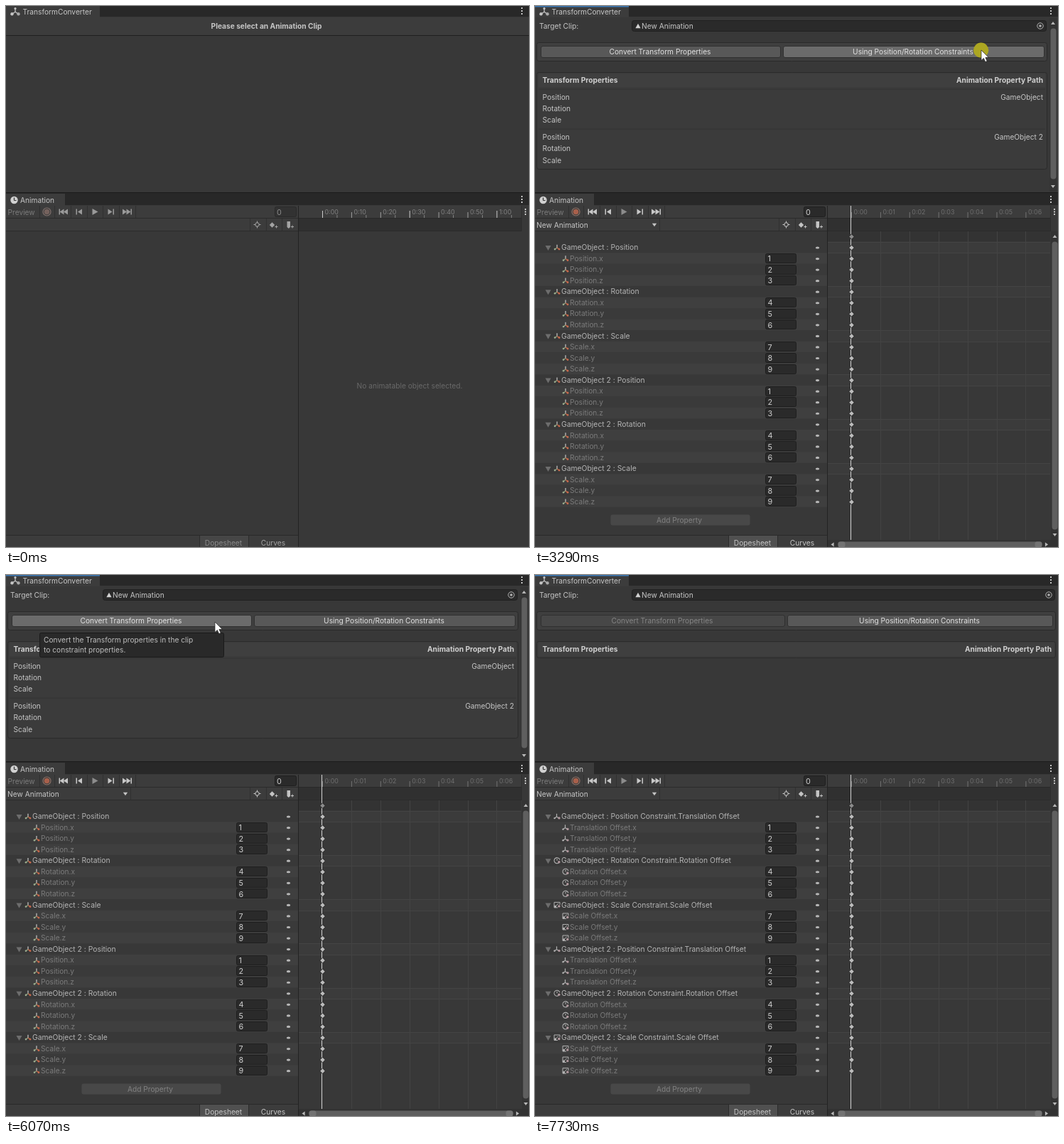
Recreate the animation shown at these times as an HTML page with a canvas. Size 736x761 px, loop 8640 ms.

```html
<!DOCTYPE html>
<html lang="en">
<head>
<meta charset="utf-8">
<title>TransformConverter</title>
<style>
html, body { margin: 0; width: 100%; height: 100%; overflow: hidden; background: #383838; }
canvas { display: block; width: 736px; height: 761px; }
</style>
</head>
<body>
<canvas id="stage" width="736" height="761"></canvas>
<script>
const g = document.getElementById('stage').getContext('2d');
const LOOP = 8640, ROW = 15.55, LIST_TOP = 331.7, TICK = 40.9;
const BG = '#383838', BAR = '#3c3c3c', DARK = '#282828', EDGE = '#232323', LABEL = '#c6c6c6', DIM = '#7b7b7b';
const PRESSES = [[3290, 3420], [4570, 4700], [7010, 7140]];

function rect(x, y, w, h, color) { g.fillStyle = color; g.fillRect(x, y, w, h); }

function box(x, y, w, h, r, fill, stroke) {
  g.beginPath();
  g.roundRect(x + .5, y + .5, w - 1, h - 1, r);
  if (fill) { g.fillStyle = fill; g.fill(); }
  if (stroke) { g.strokeStyle = stroke; g.lineWidth = 1; g.stroke(); }
}

function poly(color, ...p) {
  g.beginPath();
  for (let i = 0; i < p.length; i += 2) g.lineTo(p[i], p[i + 1]);
  g.closePath();
  g.fillStyle = color;
  g.fill();
}

function line(color, w, ...p) {
  g.beginPath();
  for (let i = 0; i < p.length; i += 4) { g.moveTo(p[i], p[i + 1]); g.lineTo(p[i + 2], p[i + 3]); }
  g.strokeStyle = color;
  g.lineWidth = w;
  g.stroke();
}

function dot(x, y, r, color, ry = r) {
  g.beginPath();
  g.ellipse(x, y, r, ry, 0, 0, 7);
  g.fillStyle = color;
  g.fill();
}

function ring(x, y, r, color, w = 1, from = 0, to = 7) {
  g.beginPath();
  g.arc(x, y, r, from, to);
  g.strokeStyle = color;
  g.lineWidth = w;
  g.stroke();
}

function text(s, x, y, color = LABEL, align = 'left', weight = 400, size = 10.2) {
  g.font = `${weight} ${size}px Inter, "Liberation Sans", sans-serif`;
  g.textAlign = align;
  g.fillStyle = color;
  g.fillText(s, x, y);
}

function menuDots(x, y, gap) { for (const d of [-gap, 0, gap]) rect(x - 1, y + d - 1, 2, 2, '#c4c4c4'); }

function arrow(x, y, dx, dy, color = '#b8b8b8', s = 3) {
  poly(color, x + dx * s * .7, y + dy * s * .7,
    x - dx * s * .7 + dy * s, y - dy * s * .7 + dx * s,
    x - dx * s * .7 - dy * s, y - dy * s * .7 - dx * s);
}

function diamond(x, y, s, color) { poly(color, x, y - s, x + s, y, x, y + s, x - s, y); }

function axes(x, y, s, up, left, right, w) {
  line(up, w, x, y + s * .15, x, y - s);
  line(left, w, x, y + s * .15, x - s * .95, y + s * .8);
  line(right, w, x, y + s * .15, x + s * .95, y + s * .8);
}

// --- upper window ---

function button(b, label, state) {
  const fill = { off: '#474747', hover: '#6b6b6b', down: '#4f657f' }[state] || '#585858';
  box(b[0], 56, b[1] - b[0], 17, 2.5, fill, '#303030');
  text(label, (b[0] + b[1]) / 2 - 1, 68, state === 'off' ? '#858585' : '#e2e2e2', 'center');
}

function converter(t, cur) {
  rect(0, 0, 736, 15, DARK);
  rect(0, 0, 132, 16, BAR);
  if (t >= 3290) rect(0, 0, 132, 1.5, '#3a78b6');
  axes(13, 7.5, 5, '#c4c4c4', '#c4c4c4', '#c4c4c4', 1.3);
  dot(13, 3.5, 1.6, '#c4c4c4');
  dot(8.5, 11.2, 2.2, '#c4c4c4');
  dot(17.5, 11.2, 2.2, '#a8a8a8');
  text('TransformConverter', 23.5, 12);
  menuDots(726, 7, 4);

  if (t < 1330) {
    rect(0, 16, 736, 25, BAR);
    rect(0, 41, 736, 1, '#202020');
    text('Please select an Animation Clip', 366.5, 32, LABEL, 'center', 700);
    return;
  }

  const done = t >= 7140, parent = t >= 3420 && t < 4700, right = done ? 733 : 721;
  text('Target Clip:', 6, 32);
  box(136, 20, right - 137, 16, 3, '#2a2a2a', '#202020');
  poly('#d2d2d2', 145, 24.8, 148.6, 31.2, 141.4, 31.2);
  text('New Animation', 150, 32);
  ring(right - 10, 28, 4.2, '#b4b4b4');
  dot(right - 10, 28, 1.8, '#b4b4b4');

  box(2, 51, right - 2, 27, 3, '#3f3f3f', '#2a2a2a');
  const split = done ? 352 : parent ? 372 : 346;
  const left = [8, split], other = [split + 3, right - 4];
  const down = PRESSES.some(([a, b]) => t >= a + 20 && t < b);
  const state = b => cur && cur[1] >= 56 && cur[1] < 73 && cur[0] >= b[0] && cur[0] < b[1]
    ? (down ? 'down' : 'hover') : '';
  button(left, 'Convert Transform Properties', done ? 'off' : state(left));
  button(other, parent ? 'Using Parent Constraints' : 'Using Position/Rotation Constraints', state(other));

  box(2, 93, right - 2, done ? 24 : 137, 3, '#3b3b3b', '#2b2b2b');
  rect(5, 95, right - 8, 19, '#3f3f3f');
  text('Transform Properties', 10.5, 108, '#d0d0d0', 'left', 700);
  text('Animation Property Path', right - 6, 108, '#d0d0d0', 'right', 700);
  if (done) return;

  ['GameObject', 'GameObject 2'].forEach((name, i) => {
    const y = 131.5 + i * 56.2;
    rect(5, y - 15, right - 8, 1, '#343434');
    ['Position', 'Rotation', 'Scale'].forEach((s, k) => text(s, 10.5, y + k * 16.4));
    text(name, right - 6, y, LABEL, 'right');
  });
  rect(724, 17, 11, 244, '#343434');
  box(725, 31, 9, 213, 4, '#5f5f5f');
  arrow(729, 24, 0, -1);
  arrow(729, 254, 0, 1);
}

// --- animation window ---

function transport(on) {
  const c = on ? '#c8c8c8' : '#9a9a9a', y = 289.5;
  const tri = (x, d, col = c) => poly(col, x, y - 4, x + 6 * d, y, x, y + 4);
  const bar = x => rect(x, y - 4, 1.5, 8, c);
  bar(74.5); tri(81.5, -1); tri(87, -1);
  bar(98.5); tri(107, -1);
  poly(on ? '#8c8c8c' : c, 121.5, y - 4.5, 129.5, y, 121.5, y + 4.5);
  tri(143.5, 1); bar(150.5);
  tri(164, 1); tri(169.5, 1); bar(175.5);
  ring(57.5, y, 5.5, on ? '#8e7167' : '#82716d', 1.2);
  dot(57.5, y, 3.8, on ? '#a8604b' : '#75625d');
}

function toolIcons(on) {
  const c = on ? '#c4c4c4' : '#a4a4a4';
  ring(353.5, 307.5, 2.8, c);
  line(c, 1, 353.5, 302.5, 353.5, 305.5, 353.5, 309.5, 353.5, 312.5,
    348.5, 307.5, 351.5, 307.5, 355.5, 307.5, 358.5, 307.5);
  diamond(374.5, 308, 3.7, c);
  poly(c, 395.5, 303, 400, 303, 400, 311, 397.8, 313, 395.5, 311);
  for (const x of [380.5, 403]) line(c, 1, x - 2, 310.5, x + 2, 310.5, x, 308.5, x, 312.5);
}

function ruler(on) {
  rect(412, 281, 314, 17, BAR);
  for (let i = 0; i < 7; i++) {
    const x = 445.5 + TICK * i;
    const label = on ? '0:0' + i : i < 6 ? '0:' + (i * 10 || '00') : '1:00';
    const major = !on && i % 3 === 0;
    line(on ? '#747474' : major ? '#cccccc' : '#a0a0a0', 1, x, major ? 288 : 290, x, 298);
    if (!on) line('#858585', 1, x + TICK / 2, 294, x + TICK / 2, 298);
    text(label, x + 3, 293, on ? '#6e6e6e' : '#808080', 'left', 400, 8.9);
  }
}

function rowIcon(kind, converted, x, y) {
  const gray = '#b2b2b2', pink = '#b49aa0';
  if (!converted) {
    axes(x, y, 3.7, '#bebebe', '#8aa27e', '#c8694c', 1.3);
    dot(x - 3, y + 2.6, 1.3, '#9bab90');
    dot(x + 3, y + 2.6, 1.4, '#c8694c');
  } else if (kind === 0) {
    axes(x - .5, y, 3.7, gray, gray, gray, 1.2);
    dot(x - 3.5, y + 2.6, 1.2, gray);
    dot(x + 3, y + 2.4, 1.6, pink);
  } else if (kind === 1) {
    ring(x, y, 4, gray, 1.1, .9, 6);
    line(gray, 1.1, x, y, x, y - 2.5);
    dot(x + 2.8, y + 2, 1.7, pink);
  } else {
    line(gray, 1, x - 4, y - 3.5, x + 4, y - 3.5, x - 4, y - 3.5, x - 4, y + 4,
      x - 4, y + 4, x + 1, y + 4, x + 4, y - 3.5, x + 4, y, x - 2, y + 2, x + 2, y - 2);
    rect(x - 4, y + 1, 3, 3, gray);
    dot(x + 2.8, y + 2, 1.7, pink);
  }
}

function keyRows(converted) {
  const kinds = ['Position', 'Rotation', 'Scale'];
  for (let i = 0; i < 24; i++) {
    const y = LIST_TOP + i * ROW, mid = y + ROW / 2, base = mid + 3.7;
    const group = i >> 2, kind = group % 3, k = i % 4;
    const offset = (kind ? kinds[kind] : 'Translation') + ' Offset';
    if (k === 0) {
      const owner = group < 3 ? 'GameObject' : 'GameObject 2';
      rect(412, y, 313, ROW, '#3b3b3b');
      rect(412, Math.round(y), 313, 1, '#444444');
      rect(412, Math.round(y + ROW), 313, 1, '#444444');
      poly('#6d6d6d', 14.5, mid - 2.5, 22.5, mid - 2.5, 18.5, mid + 4.5);
      rowIcon(kind, converted, 31, mid);
      const title = `${owner} : ${kinds[kind]}` + (converted ? ` Constraint.${offset}` : '');
      text(title, 37, base, '#b4b4b4', 'left', 400, 10.35);
    } else {
      rect(0, y, 411, ROW, i % 2 ? '#3f3f3f' : '#3a3a3a');
      rowIcon(kind, converted, 43, mid);
      text((converted ? offset : kinds[kind]) + '.' + 'xyz'[k - 1], 49, base, DIM);
      box(324, Math.round(mid - 7), 44, 14, 2, '#2a2a2a', '#1e1e1e');
      text(kind * 3 + k, 327.5, base + .5, '#cecece', 'left', 400, 10.8);
    }
    dot(397.5, mid + .5, 2.7, '#b8b8b8', 1.6);
  }
}

function timeline() {
  for (let i = 1; i < 7; i++) rect(Math.round(445 + TICK * i), 317, 1, 434, '#434343');
  rect(444, 281, 1, 470, '#d4d4d4');
  for (let i = -1; i < 24; i++) {
    const y = LIST_TOP + (i + .5) * ROW + .5;
    diamond(445.5, y, 4.4, '#2c2c2c');
    diamond(445.5, y, 3.3, i < 0 ? '#8c8c8c' : '#bcbcbc');
  }
  rect(726, 317, 10, 434, '#343434');
  box(727, 331, 9, 406, 4, '#5f5f5f');
  arrow(731.5, 324, 0, -1);
  arrow(731.5, 744, 0, 1);
  rect(412, 751, 324, 10, '#323232');
  box(426, 753, 288, 9, 4, '#5f5f5f');
  box(426, 753, 11, 9, 3, '#737373');
  box(703, 753, 11, 9, 3, '#737373');
  arrow(418.5, 757.5, -1, 0);
  arrow(720, 757.5, 1, 0);
}

function animation(t) {
  const on = t >= 1330;
  rect(0, 262, 736, 18, DARK);
  rect(0, 262, 736, 1, '#1b1b1b');
  rect(0, 264, 83, 17, BAR);
  dot(11.5, 273, 5.2, '#d0d0d0');
  line('#333333', 1.2, 11.5, 269.5, 11.5, 273.5, 11.5, 273.5, 14.5, 273.5);
  text('Animation', 20, 277);
  menuDots(726, 272, 4);

  rect(0, 281, 411, 36, BAR);
  rect(0, 298, 411, 1, '#2b2b2b');
  rect(0, 316, 411, 1, '#2b2b2b');
  text('Preview', 2.5, 293.5, DIM);
  for (const x of [47, 68, 91, 114, 136, 159, 182]) rect(x, 281, 1, 17, '#303030');
  for (const x of [343, 366, 388]) rect(x, 299, 1, 17, '#303030');
  transport(on);
  box(378, 282, 31, 15, 2, on ? '#2a2a2a' : '#323232', on ? '#1e1e1e' : '#292929');
  text('0', 381, 293.5, on ? '#cecece' : '#8a8a8a', 'left', 400, 10.8);
  toolIcons(on);
  ruler(on);
  rect(412, 298, 314, 1, '#292929');
  rect(412, 299, 314, 17, '#303030');
  rect(412, 316, 314, 1, '#2b2b2b');
  rect(725, 281, 1, 36, '#2e2e2e');
  menuDots(731, 289.5, 3.5);

  if (on) {
    text('New Animation', 2, 312);
    arrow(168, 308, 0, 1, '#c4c4c4', 3.2);
    rect(175, 299, 1, 17, '#303030');
    rect(412, 317, 313, 14, '#333333');
    keyRows(t >= 7200);
    timeline();
    box(106, 715, 197, 16, 2.5, '#484848');
    text('Add Property', 203, 727, '#828282', 'center');
  } else {
    text('No animatable object selected.', 568, 538, '#696969', 'center');
  }

  rect(0, 744, 411, 17, BAR);
  rect(0, 744, 411, 1, '#2a2a2a');
  rect(273, 745, 68, 16, on ? '#505050' : '#464646');
  rect(272, 745, 1, 16, '#2b2b2b');
  rect(341, 745, 1, 16, '#2b2b2b');
  text('Dopesheet', 306, 758.5, on ? LABEL : '#8a8a8a', 'center');
  text('Curves', 376, 758.5, on ? LABEL : '#a4a4a4', 'center');
  rect(411, 281, 1, 480, EDGE);
}

// --- pointer ---

const ease = p => { const q = 1 - (1 - p) ** 1.67; return q * q * (3 - 2 * q); };
const mix = (a, b, p) => a + (b - a) * p;
const bezier = (a, b, c, d, u) => {
  const v = 1 - u;
  return a * v ** 3 + 3 * b * u * v * v + 3 * c * u * u * v + d * u ** 3;
};

function pointer(time) {
  if (time < 1810 || time >= 7730) return null;
  const t = Math.floor((time - 10) / 20) * 20 + 10;
  const span = (a, b) => Math.min(1, Math.max(0, (t - a) / (b - a)));
  if (t < 4970) {
    const p = ease(span(1810, 2390));
    return [mix(1, 628, p), mix(274, 58, p) + 4 * span(2550, 2610)];
  }
  if (t < 7490) {
    const u = ease(span(4970, 5610));
    return [bezier(628, 500, 340, 294, u), bezier(62, 176, 176, 66, u)];
  }
  const p = span(7490, 7710) ** 1.5;
  return [mix(294, 28, p), mix(66, 158, p)];
}

function tooltip(x, first, second) {
  box(x, 81, 260, 35, 2, '#292929', '#1a1a1a');
  text(first, x + 6, 95, '#bdbdbd');
  text(second, x + 6, 108.5, '#bdbdbd');
}

function drawPointer(t, cur) {
  const [x, y] = cur;
  if (PRESSES.some(([a, b]) => t >= a && t < b)) dot(x - .3, y + .2, 10.6, '#aca622');
  poly('#ffffff', x, y, x, y + 14.5, x + 3.4, y + 11.4, x + 5.7, y + 16.6,
    x + 8.2, y + 15.5, x + 5.9, y + 10.5, x + 10.2, y + 10.3);
  g.strokeStyle = '#202020';
  g.lineWidth = .7;
  g.stroke();
}

function draw(t) {
  const cur = pointer(t);
  rect(0, 0, 736, 761, BG);
  converter(t, cur);
  animation(t);
  if (t >= 3080 && t < 3290) tooltip(403, 'Use Position and Rotation constraints, or', 'a single Parent constraint.');
  if (t >= 6070 && t < 7010) tooltip(47, 'Convert the Transform properties in the clip', 'to constraint properties.');
  if (cur) drawPointer(t, cur);
}

const start = performance.now();
function tick() {
  draw((performance.now() - start) % LOOP);
  requestAnimationFrame(tick);
}
tick();
</script>
</body>
</html>
```
